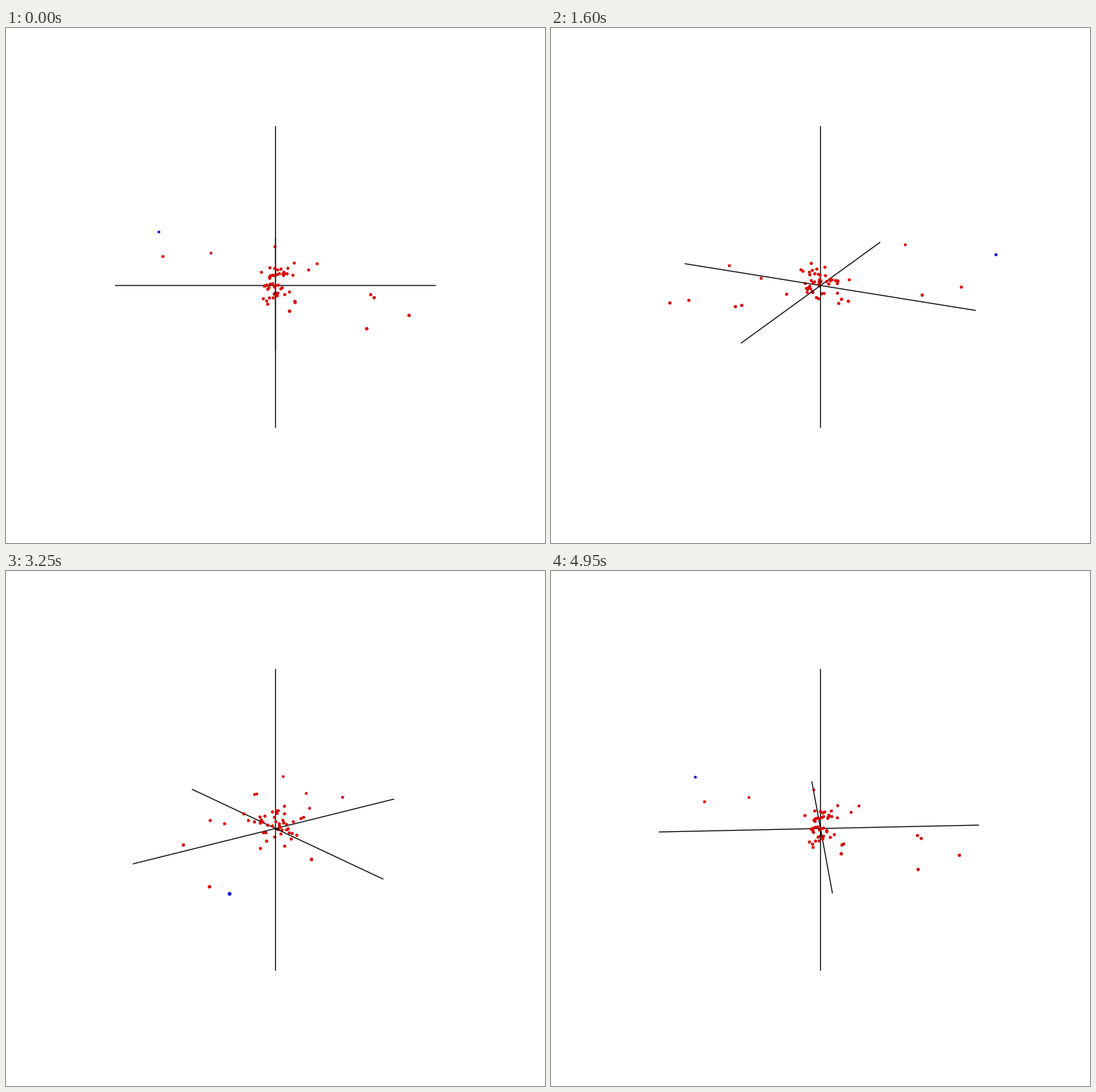
Write a matplotlib script that moves like this. It is 765x732 px and loops after 5000 ms.

```python
import numpy as np
import matplotlib.pyplot as plt
from matplotlib.animation import FuncAnimation
from matplotlib.collections import LineCollection

WIDTH, HEIGHT, DPI = 765, 732, 96
PT = 72 / DPI                      # one pixel in points
FRAMES, INTERVAL = 100, 50
CENTER = np.array([382.5, 366.0])
SCALE, DISTANCE = 227.5, 6.0       # half axis in pixels, camera distance in half axes
TILT = np.radians(20)
DOT = 3.9                          # dot diameter at the centre, without its edge
RIM = 0.5

# x right, y towards the viewer, z up, in half axes; the first point is blue
OUTLIERS = np.array([
    (-0.825, -0.886, 0.081), (0.751, 0.614, 0.044), (0.513, 0.640, -0.026),
    (0.571, 0.238, 0.028), (0.589, 0.270, 0.021), (-0.730, -0.287, 0.096),
    (-0.452, -0.773, -0.040), (-0.004, -0.667, 0.041), (0.272, -0.308, 0.039),
    (0.214, -0.239, 0.020), (0.079, 0.607, 0.067), (0.114, 0.358, 0.030),
])


def cluster(rng, count, height, spread):
    """Scatter points about the vertical axis at a mean height."""
    return rng.normal((0, 0, height), (0.053, 0.082, spread), (count, 3))


rng = np.random.default_rng(4)
POINTS = np.vstack([OUTLIERS,
                    cluster(rng, 28, 0.062, 0.030),
                    cluster(rng, 17, -0.050, 0.036)])
AXES = np.array([s * row for row in np.eye(3) for s in (-1, 1)])

FILL = np.array([(0, 0, 0.92)] + [(0.92, 0, 0)] * (len(POINTS) - 1))
EDGE = FILL * 0.78


def project(points, angle):
    """Turn points about the vertical axis; return pixels, zoom and nearness."""
    x, y, z = points.T
    c, s = np.cos(angle), np.sin(angle)
    x, y = x * c - y * s, x * s + y * c
    near = y * np.cos(TILT) + z * np.sin(TILT)
    up = z * np.cos(TILT) - y * np.sin(TILT)
    zoom = 1 / (1 - near / DISTANCE)
    pixels = CENTER + SCALE * np.column_stack([x * zoom, -up * zoom])
    return pixels, zoom, near


fig = plt.figure(figsize=(WIDTH / DPI, HEIGHT / DPI), dpi=DPI, facecolor="white")
ax = fig.add_axes([0, 0, 1, 1])
ax.set_xlim(0, WIDTH)
ax.set_ylim(HEIGHT, 0)
ax.axis("off")

behind = ax.scatter([], [], zorder=1, linewidths=RIM * PT)
lines = LineCollection([], colors="black", linewidths=1.35 * PT, zorder=2)
lines.set_snap(False)
ax.add_collection(lines)
front = ax.scatter([], [], zorder=3, linewidths=RIM * PT)


def place(dots, order, pixels, zoom):
    dots.set_offsets(pixels[order])
    dots.set_sizes((DOT * PT * zoom[order]) ** 2)
    dots.set_facecolor(FILL[order])
    dots.set_edgecolor(EDGE[order])


def draw(frame):
    angle = 2 * np.pi * frame / FRAMES
    ends, _, _ = project(AXES, angle)
    lines.set_segments(ends.reshape(3, 2, 2))
    pixels, zoom, near = project(POINTS, angle)
    order = np.argsort(near)
    place(behind, order[near[order] < 0], pixels, zoom)
    place(front, order[near[order] >= 0], pixels, zoom)
    return behind, lines, front


anim = FuncAnimation(fig, draw, frames=FRAMES, interval=INTERVAL,
                     init_func=lambda: draw(0), repeat=True, repeat_delay=0)
plt.show()
```
